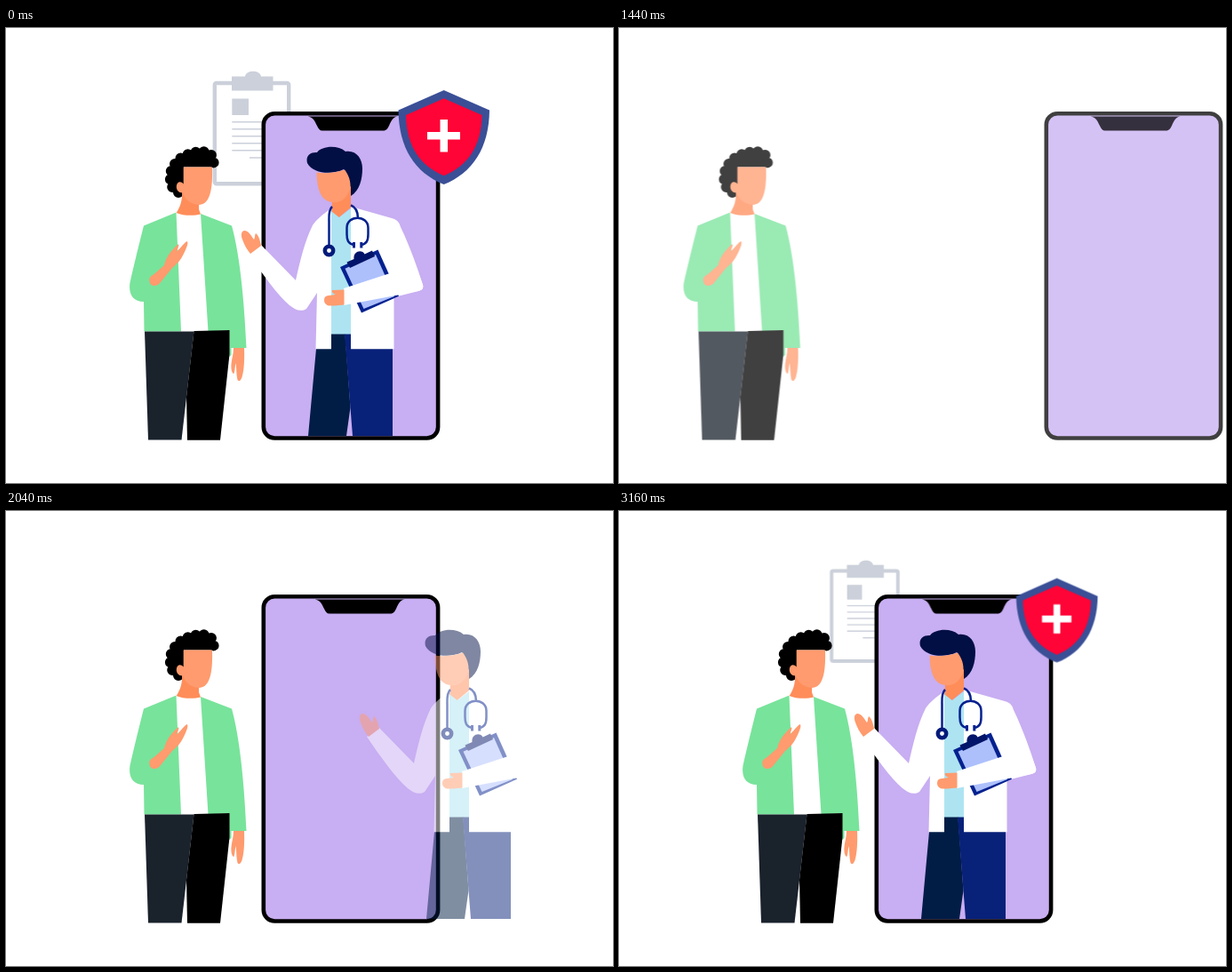
An HTML page that plays this animation: 683x512 px, repeating every 3.2 s.

```html
<!DOCTYPE html>
<html lang="en">
<head>
<meta charset="utf-8">
<title>Online doctor visit</title>
<style>
html, body { margin: 0; width: 100%; height: 100%; overflow: hidden; background: #fff; }
svg { display: block; width: 100vw; height: 100vh; }

.man, .phone, .notch, .doctor, .extra {
  animation: 3200ms linear infinite;
}
.man { animation-name: fade-base, man-move; }
.phone { animation-name: fade-base, phone-move; }
.notch { animation-name: fade-base, notch-move; }
.doctor { animation-name: fade-doctor, doctor-move; }
.extra { animation-name: fade-extra, grow; }
.board { transform-origin: 276.5px 113.3px; }
.shield { transform-origin: 492.7px 123.2px; }

/* 1.25% is one 40 ms step */
@keyframes fade-base {
  0% { opacity: 1; animation-timing-function: step-end; }
  36.25% { opacity: .933; animation-timing-function: steps(4); }
  41.25% { opacity: 0; animation-timing-function: steps(4); }
  46.25%, 100% { opacity: 1; }
}
@keyframes fade-doctor {
  0% { opacity: 1; animation-timing-function: step-end; }
  36.25% { opacity: .933; animation-timing-function: steps(4); }
  41.25% { opacity: 0; }
  61.25% { opacity: 0; animation-timing-function: steps(4); }
  66.25%, 100% { opacity: 1; }
}
@keyframes fade-extra {
  0% { opacity: 1; animation-timing-function: step-end; }
  36.25% { opacity: .933; animation-timing-function: steps(4); }
  41.25% { opacity: 0; }
  81.25% { opacity: 0; animation-timing-function: steps(4); }
  86.25%, 100% { opacity: 1; }
}
@keyframes man-move {
  0% { transform: none; animation-timing-function: step-end; }
  41.25% { transform: translateX(-66.5px); animation-timing-function: step-end; }
  52.5% { transform: translateX(-57.5px); animation-timing-function: steps(8); }
  62.5%, 100% { transform: none; }
}
@keyframes phone-move {
  0% { transform: none; animation-timing-function: step-end; }
  41.25% { transform: translateX(191px); animation-timing-function: step-end; }
  52.5% { transform: translateX(165.3px); animation-timing-function: steps(8); }
  62.5%, 100% { transform: none; }
}
@keyframes notch-move {
  0% { transform: none; animation-timing-function: step-end; }
  41.25% { transform: translateX(191px); animation-timing-function: step-end; }
  52.5% { transform: translateX(166.3px); animation-timing-function: steps(8); }
  62.5% { transform: translateX(8px); animation-timing-function: step-end; }
  91.25% { transform: translateX(7px); animation-timing-function: steps(6); }
  98.75% { transform: translateX(1.4px); animation-timing-function: step-end; }
  100% { transform: none; }
}
@keyframes doctor-move {
  0% { transform: none; animation-timing-function: step-end; }
  41.25% { transform: translateX(133px); animation-timing-function: step-end; }
  71.25% { transform: translateX(119px); animation-timing-function: steps(8); }
  81.25% { transform: translateX(5px); animation-timing-function: step-end; }
  82.5%, 100% { transform: none; }
}
@keyframes grow {
  0% { transform: none; animation-timing-function: step-end; }
  41.25% { transform: scale(.42); animation-timing-function: step-end; }
  91.25% { transform: scale(.49); animation-timing-function: steps(6); }
  98.75% { transform: scale(.895); animation-timing-function: step-end; }
  100% { transform: none; }
}

.skin { fill: #ff9b6e; }
.neck { fill: #ff8d5a; }
.green { fill: #78e39b; }
.white { fill: #fff; }
.ink { fill: #010f45; }
.blue { fill: #04218f; }
.tube { fill: none; stroke: #04218f; stroke-width: 2.5; }
</style>
</head>
<body>
<svg viewBox="0 0 683 512" preserveAspectRatio="none">
  <g class="extra board" fill="#cbd0da">
    <rect x="234.8" y="62" width="83.4" height="113.3" rx="2" fill="#fff" stroke="#cbd0da" stroke-width="4.4"/>
    <path d="M254 54.5H269C270 46.8 286 46.8 287 54.5H300.5V70.5H254ZM254.3 79.5H273V98H254.3Z"/>
    <path d="M254.3 105.7H302M254.3 113.7H302M254.3 121.7H302M254.3 129.7H302M254.3 137.7H302M274 146H302" stroke="#cbd0da" stroke-width="1.5"/>
  </g>

  <rect class="phone" x="289.8" y="96.3" width="196.3" height="365.2" rx="12.5" fill="#c8aef2" stroke="#000" stroke-width="4.6"/>
  <path class="notch" d="M339.5 99.5C345.500 100 347.500 105 350 110C351.500 113.500 353 115.500 356 115.500H424.500C428 115.500 429.500 113 431 110C433.500 104 435.500 100 441 99.500Z"/>

  <g class="man">
    <path d="M200 190L192 188C182 180 184 155 195 147C208 138 225 138 233 146L236 156.500H200Z"/>
    <path d="M194 185C182 181 183 160 190 153C197 142 222 134 231 143C233 146 234 149 233.500 154" fill="none" stroke="#000" stroke-width="12" stroke-linecap="round" stroke-dasharray="0 9.200"/>
    <path class="neck" d="M198 184L217 194V204L219 209.500C212 211.500 199 211.500 191.700 208C196 201 198.500 195 198 184Z"/>
    <path class="skin" d="M199.700 156.500H232C232.500 176 231.500 198 217.500 199C207 198.500 201 192 199 185.500C194 185.500 191.500 182 191.800 178C192.200 172.500 197 172 199.700 175.500Z"/>
    <path class="green" d="M155 222.500L191.500 207.500L197 341.500H155.500L155 308C143 308 138 300 139.300 288C141 279 150 242 155 222.500Z"/>
    <path class="green" d="M219 209L254 222.500C263 255 268 305 270.500 360H253.500V368L251 370V340L227.500 341.500Z"/>
    <path class="skin" d="M161.500 285C160.500 281 163 279 166 277.500L178 267C180 258 186 250 193.500 243.500C195.500 243 194 247 192 251C194 251 199 243 203.500 240C205.500 241 204 246 200 254C196 262 193 265 187 270L174 286C171 291 162 292 161.500 285Z"/>
    <path class="skin" d="M256 360H268C268.500 372 268 385 265.500 393C264 397.500 261.500 398 260.500 396C259 390 259.500 383 258.500 377C257.500 380 258 384 256.500 389C254 389 253 383 253.500 378C254 372 256 367 256 360Z"/>
    <path d="M156 341.500H211.500L197.500 463.500H160Z" fill="#1a222c"/>
    <path d="M211.500 341L251.500 340V367L241 463.700H204L203 415Z"/>
  </g>

  <g class="doctor">
    <path class="ink" d="M339 152C337 144 342 139.500 350 140C355 133 373 131 382 139C394 137 401 147 401 158C401 170 398 183 388 189L386 172C385 166 383 162 380 159C368 165 346 165 339 152Z"/>
    <path d="M366 204L375 213L388 203V345H366Z" fill="#aee4f2"/>
    <path class="neck" d="M367 192L388 178V202L374.700 213L366.500 206.500Z"/>
    <path class="skin" d="M349.500 162.500C358 164 372 163 381 159.500C386 166 388 173 387.500 180C384 193 374 197.500 367.500 196C356 195 350 185 349.500 162.500Z"/>
    <path d="M366 344.500H381.500L387.500 427L383 459H340L349 361H366Z" fill="#011d46"/>
    <path d="M381 344.500H388V361H435V459H390Z" fill="#082179"/>
    <path class="white" d="M366 203C357 209 349 216 345 222C336 240 331 262 326 284L287 244L273 254C288 276 305 300 319 312C325 317 332 320 338 316L350 298L348.500 361.300H366Z"/>
    <path class="white" d="M388 201L434 214C441 216 442.500 219 444 224C455 247 463 270 469 289C470 293 468 295 464 296L436.500 303V361.300H388Z"/>
    <path class="skin" d="M275 254L287 245C286 240 285 234 281 231C279.500 233 280.500 236 279 238C276 234 273 228 268 228C264 229 264.500 234 266 238C268 244 271 249 275 254Z"/>

    <path class="tube" d="M367 201C362.500 205 363.500 213 363.500 218V246M388 199.500C394.500 202 396 208 396 214M392 244C384.500 243 383.500 238 383.500 232V225C383.500 210 407.500 210 407.500 225V232C407.500 239 406 243 399.500 244"/>
    <path class="blue" d="M390 241H393V247.500H390ZM398.300 241H401.300V247.500H398.300Z"/>
    <circle cx="363.500" cy="250.500" r="4.700" fill="#fff" stroke="#021a7a" stroke-width="4.500"/>

    <path class="blue" d="M376 269L418.500 249.500L442 301.700L400 320.500Z"/>
    <path d="M381.500 270.800L416 255L437 302L402.500 316Z" fill="#adc0fc"/>
    <path d="M383.500 263.500L391.500 260C390.500 250.500 401 249 403.500 254.500L412 250.500L415 257L387 270Z" fill="#021469"/>
    <path class="white" d="M380 293L432 276L462 270L469 289C470 293 468 295 464 296L441 300.500L380 312Z"/>
    <path class="skin" d="M380.500 294.500L367 295C366 297 368 299 371 299.700C366 301 360 300.500 358.500 303.500C357 308 359 312 364 312.500C370 313 376 311.500 380.500 311.500Z"/>
  </g>

  <g class="extra shield">
    <path d="M492.700 70L544 92.500C543.500 135 525 163 492.700 176C460 163 442 135 441.500 92.500Z" fill="#3a4f96"/>
    <path d="M492.700 79.300L535.500 98C535 133 519.500 155 492.700 166.300C466 155 450.500 133 450 98Z" fill="#ff0436"/>
    <path class="white" d="M488.500 103H497V117H511V125.500H497V139.500H488.500V125.500H474V117H488.500Z"/>
  </g>
</svg>
</body>
</html>
```
